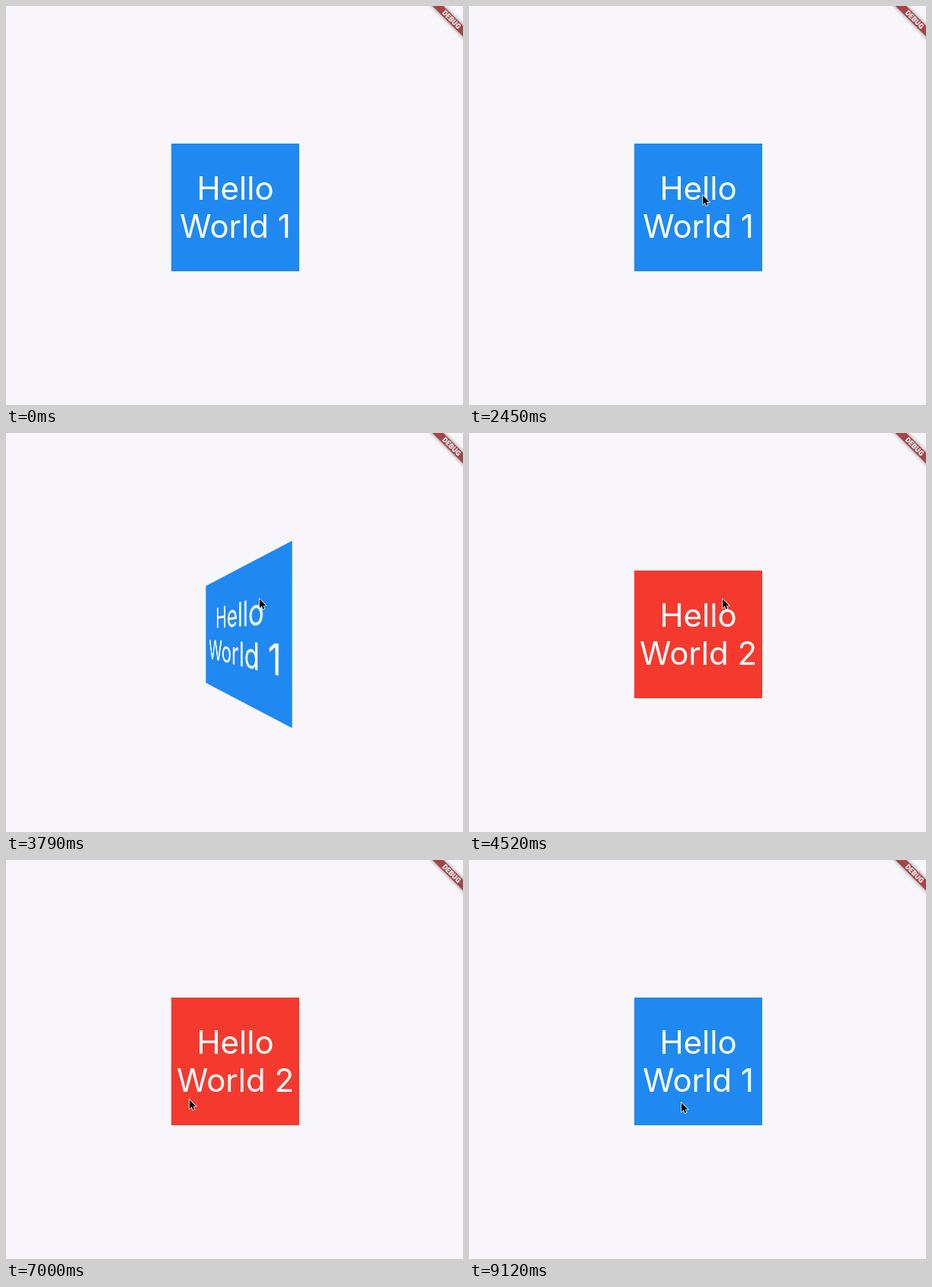
These frames come from a looping animation (600 px wide and 525 px high, 9.56 s). An HTML page:

```html
<!DOCTYPE html>
<html lang="en">
<head>
<meta charset="utf-8">
<title>Flip card</title>
<style>
  html, body { margin: 0; width: 100%; height: 100%; overflow: hidden; background: #f8f6fa; }
  #stage { position: relative; width: 600px; height: 525px; overflow: hidden; }
  #card {
    position: absolute; left: 217.4px; top: 180.6px; width: 168px; height: 168px;
    box-sizing: border-box; padding-top: 34.4px;
    color: #fff; font: 430 42px/50px Inter, "Open Sans", sans-serif;
    text-align: center; white-space: nowrap;
  }
  #banner {
    position: absolute; left: 545px; top: 13px; width: 80px; height: 10px;
    transform: rotate(45deg); background: #a54546; box-shadow: 0 0 5px rgba(0, 0, 0, .5);
    color: #fff; font: 900 9.3px/10px Roboto, sans-serif; text-align: center;
  }
  #cursor { position: absolute; left: 0; top: 0; overflow: visible; }
</style>
</head>
<body>
<div id="stage">
  <div id="card">Hello<br>World <span id="number">1</span></div>
  <div id="banner">DEBUG</div>
  <svg id="cursor" width="12" height="18">
    <path transform="translate(1 1.5) scale(.9)" d="M0 0V13.2L3 10.4L5 15L7.2 14L5.2 9.6H9.4Z"
      fill="#000" stroke="#fff" stroke-width="1.6" paint-order="stroke"/>
  </svg>
</div>
<script>
const LOOP = 9560;
const FLIP = 400;
const TRAVEL = 500;

// Each flip shows the red side until it is turned back
const flips = [
  { over: 1088, back: 2050 },
  { over: 3640, back: 4960 },
  { over: 6600, back: 7870 }
];

// The pointer rests at each place until it travels to the next
const rests = [
  { arrive: 0, x: 325, y: 530 },
  { arrive: 850, x: 290, y: 253 },
  { arrive: 2850, x: 487, y: 189 },
  { arrive: 3600, x: 332, y: 217 },
  { arrive: 5480, x: 358, y: 210 },
  { arrive: 6550, x: 240, y: 314 },
  { arrive: 9120, x: 278, y: 318 }
];

const card = document.getElementById("card");
const number = document.getElementById("number");
const cursor = document.getElementById("cursor");
const clamp = v => Math.min(1, Math.max(0, v));
const smooth = v => v * v * (3 - 2 * v);

// Cubic Bezier ease-in-out (.42, 0, .58, 1), solved by bisection
function easeInOut(x) {
  let low = 0, high = 1;
  for (let i = 0; i < 20; i++) {
    const s = (low + high) / 2, r = 1 - s;
    if (3 * r * r * s * .42 + 3 * r * s * s * .58 + s ** 3 < x) low = s;
    else high = s;
  }
  return smooth(low);
}

const progress = (time, begin, length) => easeInOut(clamp((time - begin) / length));

function drawCard(time) {
  const turn = flips.reduce((sum, { over, back }) =>
    sum + progress(time, over, FLIP) - progress(time, back, FLIP), 0);
  const red = turn > .5;
  const angle = 180 * (red ? 1 - turn : -turn);
  card.style.transform = `perspective(210px) rotateY(${angle.toFixed(2)}deg)`;
  card.style.background = red ? "#f43a2f" : "#1f89f1";
  number.textContent = red ? 2 : 1;
}

function drawCursor(time) {
  let { x, y } = rests[0];
  for (const rest of rests.slice(1)) {
    const part = progress(time, rest.arrive - TRAVEL, TRAVEL);
    x += (rest.x - x) * part;
    y += (rest.y - y) * part;
  }
  cursor.style.transform = `translate(${x.toFixed(1)}px, ${y.toFixed(1)}px)`;
}

let start;
function frame(now) {
  start ??= now;
  const time = (now - start) % LOOP;
  drawCard(time);
  drawCursor(time);
  requestAnimationFrame(frame);
}
requestAnimationFrame(frame);
</script>
</body>
</html>
```
